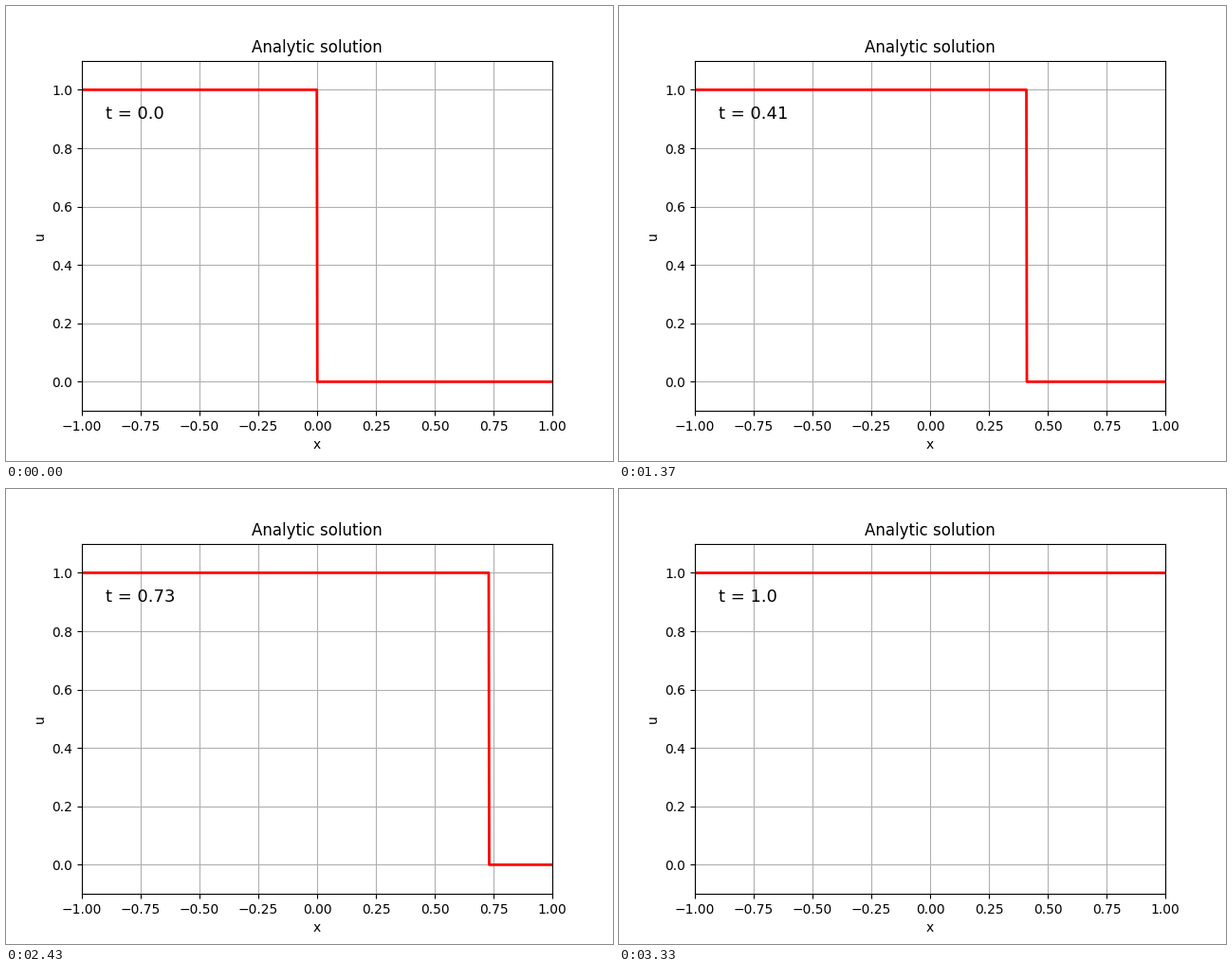
A matplotlib script that plays this animation: 640 px wide and 480 px high, repeating every 3360 ms.

```python
import numpy as np
import matplotlib.pyplot as plt
from matplotlib.animation import FuncAnimation

LOOP_MS = 3360
STEPS = 101

x = np.linspace(-1, 1, 1000)


def step_profile(t):
    """Unit step whose front travels right at speed 1."""
    return np.where(x <= t, 1.0, 0.0)


fig, ax = plt.subplots(figsize=(6.4, 4.8), dpi=100)
ax.set(xlim=(-1, 1), ylim=(-0.1, 1.1), xlabel="x", ylabel="u",
       title="Analytic solution")
ax.grid(True)

line, = ax.plot(x, step_profile(0), color="red", lw=2)
label = ax.text(-0.9, 0.9, "", fontsize=13)


def update(i):
    t = round(i / (STEPS - 1), 2)
    line.set_ydata(step_profile(t))
    label.set_text(f"t = {t}")
    return line, label


anim = FuncAnimation(fig, update, frames=STEPS, interval=LOOP_MS / STEPS,
                     repeat=True, repeat_delay=0)
plt.show()
```
